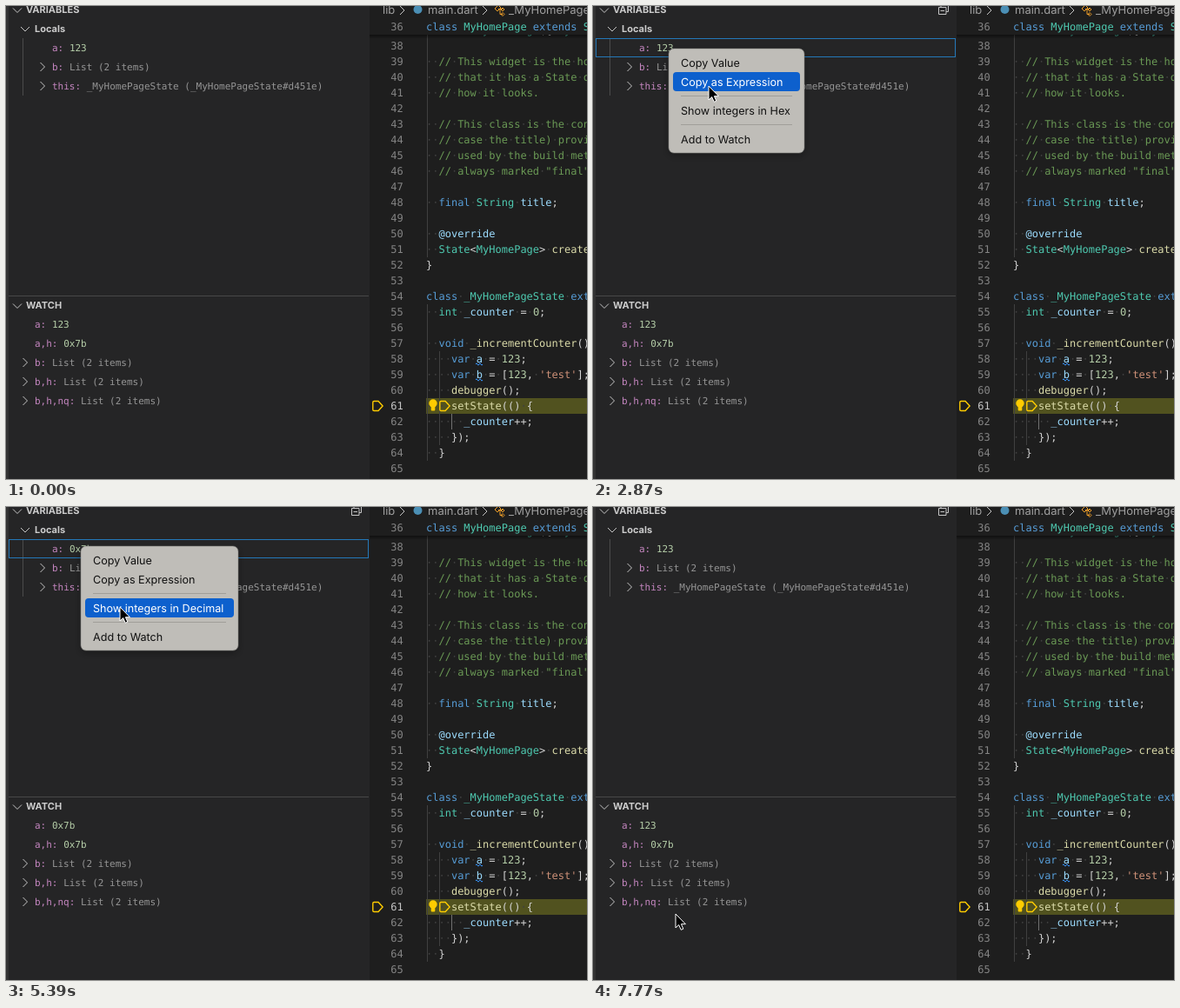
An HTML page for the animation above (8000 ms loop, 668 by 544 pixels).

```html
<!DOCTYPE html>
<html lang="en">
<head>
<meta charset="utf-8">
<title>Debugger: integers in hex</title>
<style>
html, body { margin: 0; width: 100%; height: 100%; overflow: hidden; background: #1e1e1e; }
svg { display: block; }
text { white-space: pre; text-rendering: geometricPrecision; font-family: "DejaVu Sans Mono", monospace; }
.code { font-size: 12px; fill: #d4d4d4; }
.row { font-size: 11px; fill: #959595; }
.ui { font: 13px Inter, sans-serif; fill: #a0a0a0; }
.head { font: bold 11px Inter, sans-serif; fill: #cccccc; }
.item { font: 12.6px Inter, sans-serif; }
.icon { fill: none; stroke: #c5c5c5; }
.name { fill: #c586c0; }
.num { fill: #b5cea8; }
</style>
</head>
<body>
<svg id="stage" width="668" height="544" viewBox="0 0 668 544"></svg>
<script>
const LOOP = 8000, STEP = 70;

// Editor text by line number
const code = {
  37: "  const MyHomePage({Key? key, required",
  39: "  // This widget is the home page of",
  40: "  // that it has a State object (defined",
  41: "  // how it looks.",
  43: "  // This class is the configuration",
  44: "  // case the title) provided by the",
  45: "  // used by the build method of the",
  46: "  // always marked \"final\".",
  48: "  final String title;",
  50: "  @override",
  51: "  State<MyHomePage> createState() =>",
  52: "}",
  54: "class _MyHomePageState extends State",
  55: "  int _counter = 0;",
  57: "  void _incrementCounter() {",
  58: "    var a = 123;",
  59: "    var b = [123, 'test'];",
  60: "    debugger();",
  61: "    setState(() {",
  62: "      _counter++;",
  63: "    });",
  64: "  }"
};

// Token kinds, tried in order
const kinds = [
  [/\/\/.*/, "#6a9955"],
  [/'[^']*'/, "#ce9178"],
  [/\b(?:class|extends|final|void|var|const|required)\b/, "#569cd6"],
  [/\b(?:_?[A-Z]\w*|int)\b/, "#4ec9b0"],
  [/\b\w+(?=\()/, "#dcdcaa"],
  [/\b\d+\b/, "#b5cea8"],
  [/@?\b\w+\b/, "#9cdcfe"]
];
const tokenRe = new RegExp(kinds.map(k => `(${k[0].source})`).join("|"), "g");

const esc = s => s.replace(/&/g, "&amp;").replace(/</g, "&lt;").replace(/>/g, "&gt;");
const span = (s, fill) => `<tspan fill="${fill}">${s}</tspan>`;
const dots = s => esc(s).replace(/ +/g, m => span("·".repeat(m.length), "#404040"));
const rect = (x, y, w, h, fill, more = "") =>
  `<rect x="${x}" y="${y}" width="${w}" height="${h}" fill="${fill}" ${more}/>`;
const text = (x, y, cls, s, more = "") => `<text x="${x}" y="${y}" class="${cls}" ${more}>${s}</text>`;
const path = (d, more = "") => `<path d="${d}" class="icon" ${more}/>`;
const right = (x, y) => path(`M${x - 2.5} ${y - 5}l5 5-5 5`);
const down = (x, y) => path(`M${x - 5} ${y - 2.5}l5 5 5-5`);

function paint(line, space) {
  let out = "", at = 0;
  for (const m of line.matchAll(tokenRe)) {
    const kind = m.slice(1).findIndex(g => g !== undefined);
    out += space(line.slice(at, m.index)) + span(space(m[0]), kinds[kind][1]);
    at = m.index + m[0].length;
  }
  return out + space(line.slice(at));
}

function lineNumber(n, y) {
  const fill = n === 61 ? "#c6c6c6" : "#858585";
  return text(456.8, y, "code", n, `text-anchor="end" style="fill:${fill}"`);
}

function editor() {
  const guide = (x, y1, y2, c = "#404040") => path(`M${x} ${y1}V${y2}`, `style="stroke:${c}"`);
  const pointer = x => path(`M${x} 455.8q0-1.3 1.3-1.3h5l5 5.5-5 5.5h-5q-1.3 0-1.3-1.3z`,
    `style="stroke:#ffcc00;stroke-width:1.4"`);
  const squiggle = y => path(`M540 ${y}q1-2.4 2 0t2 0 2 0 2 0`, `style="stroke:#3794ff"`);

  let out = rect(418, 0, 250, 544, "#1e1e1e") + rect(483, 451, 185, 18, "#51521f");
  out += guide(484.5, 33, 289) + guide(484.5, 343, 523) + guide(498.5, 397, 505)
    + guide(512.5, 469, 487, "#707070");
  for (let n = 37; n <= 65; n++) {
    const y = 50 + (n - 38) * 18;
    out += lineNumber(n, y) + text(483, y, "code", paint(code[n] || "", dots));
  }
  out += squiggle(412) + squiggle(430) + pointer(421.8) + pointer(498.8);
  out += `<circle cx="491" cy="457" r="4.7" fill="#ffcc00"/>` + rect(488.7, 460, 4.6, 5.5, "#ffcc00", 'rx="1"');

  // Sticky line and breadcrumbs
  out += rect(418, 0, 250, 33, "#1e1e1e") + rect(418, 33, 250, 5, "url(#shade)");
  out += lineNumber(36, 28) + text(483, 28, "code", paint("class MyHomePage extends StatefulWidget", esc));
  out += text(433, 9, "ui", "lib") + text(485, 9, "ui", "main.dart") + text(578, 9, "ui", "_MyHomePage");
  out += right(455.5, 5) + right(550.5, 5);
  out += `<circle cx="473.5" cy="4" r="5" fill="#4b8fb5"/>`;
  out += path("M562 3l4-4 3 3-4 4zM566 3.5h5M568 3.5v6h3M571 2l2 2-2 2-2-2zM571 7.5l2 2-2 2-2-2z",
    'style="stroke:#ee9d28"');
  return out;
}

function row(x, y, name, value, cls = "") {
  return text(x, y + 4, "row", `<tspan class="name">${name}:</tspan> <tspan class="${cls}">${value}</tspan>`);
}

function sidebar() {
  let out = rect(0, 0, 3, 544, "#333333") + rect(3, 0, 415, 544, "#252526") + rect(3, 333, 414, 1, "#484848");
  out += down(13, 5) + text(23, 8, "head", "VARIABLES") + down(22, 26.5) + text(33, 30, "head", "Locals");
  out += path("M19.5 37V103", 'style="stroke:#4b4b4b"');
  out += row(53, 48, "a", "123", "num live");
  out += right(42, 70) + row(53, 70, "b", "List (2 items)");
  out += right(42, 92) + row(53, 92, "this", "_MyHomePageState (_MyHomePageState#d451e)");
  out += down(13, 345) + text(23, 348, "head", "WATCH");
  out += row(33, 366, "a", "123", "num live") + row(33, 388, "a,h", "0x7b", "num");
  ["b", "b,h", "b,h,nq"].forEach((name, i) => {
    const y = 410 + i * 22;
    out += right(22, y) + row(33, y, name, "List (2 items)");
  });
  out += `<g id="collapse">${path("M400 1.5v-2.5h8.5v7.5H406M397.5 1.5h8.5v8h-8.5zM399.5 5.5h4.5")}</g>`;
  out += rect(3.5, 37.5, 413, 21, "none", 'id="focus" stroke="#2478b8"');
  return out;
}

const itemY = [16, 38, 71, 104];

function menu(id, x, y, w, format) {
  const labels = ["Copy Value", "Copy as Expression", `Show integers in ${format}`, "Add to Watch"];
  let out = rect(0, 0, w, 120, "#bfbdb8", 'rx="6" stroke="#77767280" filter="url(#drop)"');
  for (const s of [54.5, 87.5]) out += rect(14, s - 0.5, w - 28, 1, "#a09e99");
  out += rect(5, 0, w - 10, 22, "#0d60cd", 'rx="4" class="bar"');
  labels.forEach((s, i) => { out += text(14, itemY[i] + 4.5, "item", s); });
  return `<g id="${id}" transform="translate(${x} ${y})">${out}</g>`;
}

const stage = document.getElementById("stage");
stage.innerHTML = `<defs>
  <linearGradient id="shade" x2="0" y2="1"><stop stop-opacity=".5"/><stop offset="1" stop-opacity="0"/></linearGradient>
  <filter id="drop" x="-20%" y="-20%" width="140%" height="150%">
    <feDropShadow dx="0" dy="3" stdDeviation="4" flood-opacity=".3"/></filter></defs>`
  + editor() + sidebar()
  + menu("hexMenu", 87, 49, 156, "Hex") + menu("decMenu", 86, 45, 181, "Decimal")
  + `<path id="cursor" d="M0 0V16l3.7-3.4 2.5 5.7 2.6-1.1-2.4-5.5h5z" fill="#000" stroke="#fff" stroke-linejoin="round"/>`;

const get = id => document.getElementById(id);
const live = stage.querySelectorAll(".live");
const show = (id, on) => { get(id).style.display = on ? "" : "none"; };
const within = (t, a, b) => t >= a && t < b;

// Pointer keys: time, x, y
const keys = [
  [630, 668, 510], [1050, 330, 260], [1470, 75, 36], [1680, 75, 41], [1820, 75, 41], [2170, 86, 48],
  [2380, 86, 48], [2590, 105, 66], [2660, 105, 66], [2870, 133, 92], [3010, 131, 118],
  [3570, 131, 118], [4060, 138, 115], [4620, 85, 44], [5110, 85, 44], [5390, 131, 115],
  [6580, 131, 115], [7420, 98, 430], [7770, 95, 468], [LOOP, 95, 468]
];

function pointerAt(t) {
  const i = Math.max(1, keys.findIndex(k => k[0] > t));
  const [t0, x0, y0] = keys[i - 1], [t1, x1, y1] = keys[i];
  const u = Math.min(1, Math.max(0, (t - t0) / (t1 - t0)));
  const e = t1 === 1050 ? u * u : t1 === 1470 ? u * (2 - u) : u * u * (3 - 2 * u);
  return [x0 + (x1 - x0) * e, y0 + (y1 - y0) * e];
}

function drawMenu(id, top, t, open, blink, fade, y) {
  const end = fade + 280;
  show(id, within(t, open, end));
  const g = get(id), bar = g.querySelector(".bar");
  g.setAttribute("opacity", t < fade ? 1 : Math.max(0, 1 - (t - fade) / 280));
  const hit = itemY.findIndex(c => Math.abs(y - top - c) <= 11);
  const lit = within(t, blink, blink + STEP) ? -1 : hit;
  bar.style.display = lit < 0 ? "none" : "";
  if (lit >= 0) bar.setAttribute("y", itemY[lit] - 11);
  g.querySelectorAll("text").forEach((el, i) => el.setAttribute("fill", i === lit ? "#fff" : "#111"));
}

function draw(now) {
  const t = Math.floor(now % LOOP / STEP) * STEP;
  const [x, y] = pointerAt(t);
  show("cursor", t >= 700);
  get("cursor").setAttribute("transform", `translate(${x.toFixed(1)} ${y.toFixed(1)})`);
  show("collapse", t >= 1890);
  show("focus", within(t, 2310, 3570) || within(t, 4830, 6230));
  drawMenu("hexMenu", 49, t, 2380, 3080, 3220, y);
  drawMenu("decMenu", 45, t, 4900, 5670, 5950, y);
  const value = within(t, 3640, 6370) ? "0x7b" : "123";
  live.forEach(el => { el.textContent = value; });
}

const start = performance.now();
function tick() {
  draw(performance.now() - start);
  requestAnimationFrame(tick);
}
tick();
</script>
</body>
</html>
```
